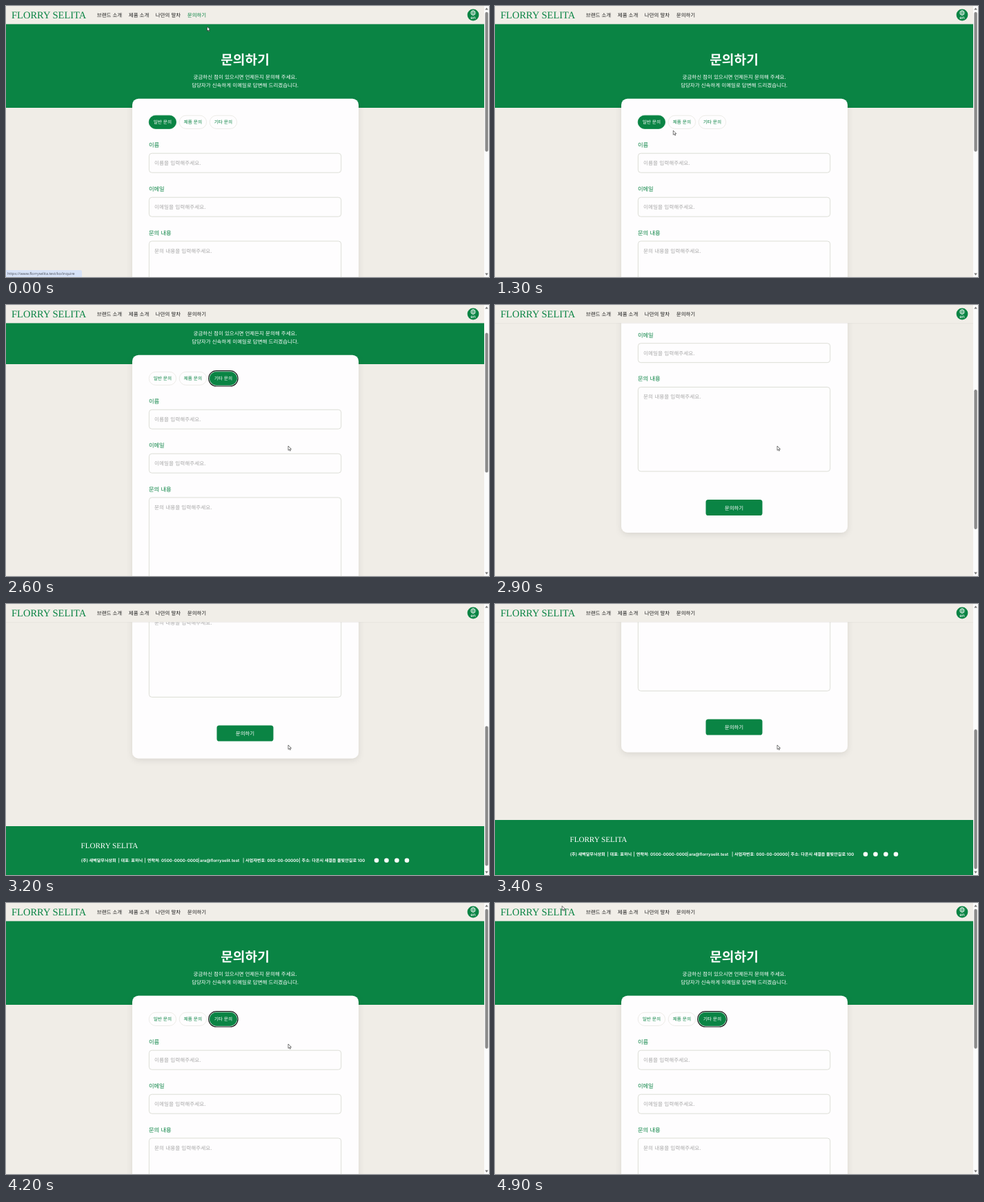
Recreate the animation shown at these times as an HTML page. Size 700 px wide and 394 px high, loop 5000 ms.

```html
<!DOCTYPE html>
<html lang="ko">
<head>
<meta charset="utf-8">
<title>문의하기</title>
<style>
  html, body { margin: 0; width: 100%; height: 100%; overflow: hidden; background: #f0ede7; }
  svg { display: block; width: 700px; height: 394px; }
  text { font: 400 7.45px 'Noto Sans CJK KR', 'Noto Sans CJK', 'Noto Sans KR', sans-serif; text-rendering: geometricPrecision; white-space: pre; }
  .mid { text-anchor: middle; }
  .green { fill: #0a8444; }
  .white { fill: #fff; }
  .title { font-size: 19.2px; font-weight: 700; }
  .lead { font-size: 7.48px; font-weight: 500; }
  .label { font-size: 8.25px; font-weight: 500; }
  .hint { font-size: 7.62px; fill: #a8a8a8; }
  .field { fill: #fefdfe; stroke: #d3d6cc; stroke-width: .8; }
  .pill text { font-size: 6.7px; font-weight: 500; }
  .send { font-weight: 500; }
  .brand { font-family: 'Liberation Serif', serif; font-size: 14.5px; }
  .foot text { font-family: Inter, 'Noto Sans CJK KR', 'Noto Sans CJK', sans-serif; font-size: 6.1px; font-weight: 600; fill: #fff; }
  .foot .brand { font-family: 'Liberation Serif', serif; font-size: 11.1px; font-weight: 400; }
  .lang { font-family: Inter, sans-serif; font-size: 6.2px; font-weight: 500; }
  .url { font-family: 'Open Sans', sans-serif; font-size: 5.4px; fill: #484d56; }
</style>
</head>
<body>
<svg viewBox="0 0 700 394">
  <defs>
    <filter id="soft" x="-10%" y="-10%" width="120%" height="120%">
      <feDropShadow dx="0" dy="2.5" stdDeviation="4.5" flood-color="#000" flood-opacity=".1"/>
    </filter>
  </defs>
  <rect width="700" height="394" fill="#f0ede7"/>

  <g id="page">
    <rect y="20" width="693" height="128" class="green"/>
    <text class="title white mid" x="346.5" y="85.2">문의하기</text>
    <text class="lead white mid" x="346.5" y="106.4">궁금하신 점이 있으시면 언제든지 문의해 주세요.</text>
    <text class="lead white mid" x="346.5" y="118.2">담당자가 신속하게 이메일로 답변해 드리겠습니다.</text>
    <rect x="183" y="134.7" width="328" height="418.8" rx="9" fill="#fefdfe" filter="url(#soft)"/>
    <g id="pills"></g>
    <g id="fields"></g>
    <rect x="305.5" y="505.5" width="82" height="23" rx="3.6" class="green"/>
    <text class="send white mid" x="346.5" y="520.3">문의하기</text>
    <g class="foot">
      <rect y="652" width="693" height="80" class="green"/>
      <text class="brand" x="108.5" y="684.4">FLORRY SELITA</text>
      <g id="info"></g>
    </g>
  </g>

  <rect y="26" width="693" height="1.2" fill="#000" opacity=".05"/>
  <rect width="693" height="26.4" fill="#f1eee8"/>
  <text class="brand green" x="8" y="18.1">FLORRY SELITA</text>
  <g id="nav" fill="#1c1c1c"></g>
  <circle cx="677" cy="13" r="8.4" class="green"/>
  <g fill="none" stroke="#fff" stroke-width=".65">
    <circle cx="677" cy="10" r="3.4"/>
    <ellipse cx="677" cy="10" rx="1.5" ry="3.4"/>
    <path d="M673.6 10h6.8M674.2 8.2h5.6M674.2 11.8h5.6" stroke-width=".45"/>
  </g>
  <text class="lang white mid" x="677" y="18.9">en</text>

  <rect x="693" width="7" height="394" fill="#fbfbfb"/>
  <path d="M694.3 5.6h4.6l-2.3-3.2zM694.3 388.6h4.6l-2.3 3.2z" fill="#747474"/>
  <rect id="thumb" x="694.4" y="8.8" width="4.4" height="203" rx="2.2" fill="#8a8a8a"/>

  <g id="status">
    <path d="M0 384H108q2 0 2 2V394H0z" fill="#d8e3f8"/>
    <text class="url" x="2" y="391.1">https://www.florryselita.test/ko/inquire</text>
  </g>

  <path id="arrow" d="M0 0V6.3L1.5 5L2.5 7.2L3.5 6.7L2.5 4.6H4.5Z" fill="#fff" stroke="#222" stroke-width=".6" stroke-linejoin="round"/>
  <path id="hand" d="M-.7 .5q.7-1 1.4 0V3.4q.7-.5 1.3.1q.7-.4 1.2.2q.8-.2 1 .6V6.6L3.4 9.2H-.6L-2.6 5.9q-.2-1 .8-.8L-.7 6.1Z" fill="#fff" stroke="#222" stroke-width=".65" stroke-linejoin="round"/>
</svg>

<script>
const GREEN = '#0a8444', LOOP = 5000, STEP = 100;
const $ = id => document.getElementById(id);

function add(parent, tag, attrs, label) {
  const el = document.createElementNS('http://www.w3.org/2000/svg', tag);
  for (const k in attrs) el.setAttribute(k, attrs[k]);
  if (label) el.textContent = label;
  parent.append(el);
  return el;
}
const set = (el, attrs) => { for (const k in attrs) el.setAttribute(k, attrs[k]); };

const links = [[132, '브랜드 소개'], [178, '제품 소개'], [217, '나만의 말차'], [263, '문의하기']]
  .map(([x, s]) => add($('nav'), 'text', { x: x - .2, y: 15.9 }, s));

const pills = [[207.2, '일반 문의'], [251.2, '제품 문의'], [295.2, '기타 문의']].map(([x, s]) => {
  const g = add($('pills'), 'g', { class: 'pill' });
  return {
    x,
    ring: add(g, 'rect', { x: x - 1.5, y: 157.6, width: 42.4, height: 22.4, rx: 11.2, fill: '#fff', stroke: '#101512', 'stroke-width': 1.2 }),
    body: add(g, 'rect', { x, y: 159.2, width: 39.4, height: 19.2, rx: 9.6, 'stroke-width': .8 }),
    text: add(g, 'text', { x: x + 19.7, y: 171.4, class: 'mid' }, s)
  };
});

[[202, '이름', '이름을 입력해주세요.', 28],
 [266, '이메일', '이메일을 입력해주세요.', 28],
 [329.7, '문의 내용', '문의 내용을 입력해주세요.', 122.5]].forEach(([y, label, hint, height]) => {
  const box = $('fields');
  add(box, 'text', { x: 206.9, y: y + 3, class: 'label green' }, label);
  add(box, 'rect', { x: 207.4, y: y + 12.2, width: 278.3, height, rx: 4, class: 'field' });
  add(box, 'text', { x: 215, y: y + 29, class: 'hint' }, hint);
});

[[108.8, '(주) 새벽달무늬상회'], [162.2, '|'], [166.6, '대표: 표하늬'], [200.6, '|'],
 [204.8, '연락처: 0500-0000-0000'], [278, '|'], [281, 'ara@florryselit.test'], [343, '|'],
 [347, '사업자번호: 000-00-00000'], [424.6, '|'], [428.6, '주소: 다온시 새결읍 물빛안길로 100']]
  .forEach(([x, s]) => add($('info'), 'text', { x, y: 704.2 }, s));
[537, 551.5, 566.4, 581].forEach(cx => add($('info'), 'circle', { cx, cy: 701.8, r: 3.3, fill: '#fff' }));

// Rows: time, then values
const scrollKeys = [[2400, 0], [2500, 18], [2600, 62], [2700, 118], [2800, 172], [2900, 222.5], [3000, 268],
  [3100, 306], [3200, 329], [3300, 338], [3600, 338], [3700, 288], [3800, 196], [3900, 108.5], [4000, 46], [4100, 11], [4200, 0]];
const mouseKeys = [[0, 291.5, 30], [400, 292, 72], [900, 268, 150], [1300, 258.3, 181], [1500, 268, 172],
  [1800, 272, 171], [2000, 306.5, 170], [2300, 311, 171], [2600, 409, 205], [4250, 409, 205], [4900, 97.2, 4.3]];
const fadeKeys = [[0, 1], [300, 0]];
const linear = k => k, smooth = k => k * k * (3 - 2 * k);

function at(keys, t, ease) {
  if (t <= keys[0][0]) return keys[0].slice(1);
  const i = keys.findIndex(k => k[0] > t);
  if (i < 0) return keys[keys.length - 1].slice(1);
  const a = keys[i - 1], b = keys[i];
  const k = ease((t - a[0]) / (b[0] - a[0]));
  return a.slice(1).map((v, j) => v + (b[j + 1] - v) * k);
}

function draw(t) {
  const [scroll] = at(scrollKeys, t, linear);
  const [mx, my] = at(mouseKeys, t, smooth);
  const [fade] = at(fadeKeys, t, linear);
  const chosen = t < 1600 ? 0 : t < 2200 ? 1 : 2;
  let over = false;

  set($('page'), { transform: `translate(0 ${-scroll})` });
  set($('thumb'), { y: 8.8 + scroll * .513 });
  set($('status'), { opacity: t < 200 ? 1 : fade });
  set(links[3], { fill: `rgb(${28 - 18 * fade},${28 + 104 * fade},${28 + 40 * fade})` });

  pills.forEach((p, i) => {
    const py = my + scroll;
    const hover = mx > p.x && mx < p.x + 39.4 && py > 159.2 && py < 178.4;
    const on = i === chosen;
    over = over || hover;
    set(p.ring, { opacity: on && t >= 1600 ? 1 : 0 });
    set(p.body, { fill: on ? GREEN : '#fefdfe', stroke: on || hover ? GREEN : '#e9e7e3' });
    set(p.text, { fill: on ? '#fff' : GREEN });
  });

  const place = `translate(${mx} ${my})`;
  set($('arrow'), { transform: place, opacity: over ? 0 : 1 });
  set($('hand'), { transform: place, opacity: over ? 1 : 0 });
}

const start = performance.now();
function tick() {
  const t = (performance.now() - start) % LOOP;
  draw(Math.floor(t / STEP) * STEP);
  requestAnimationFrame(tick);
}
draw(0);
requestAnimationFrame(tick);
</script>
</body>
</html>
```
